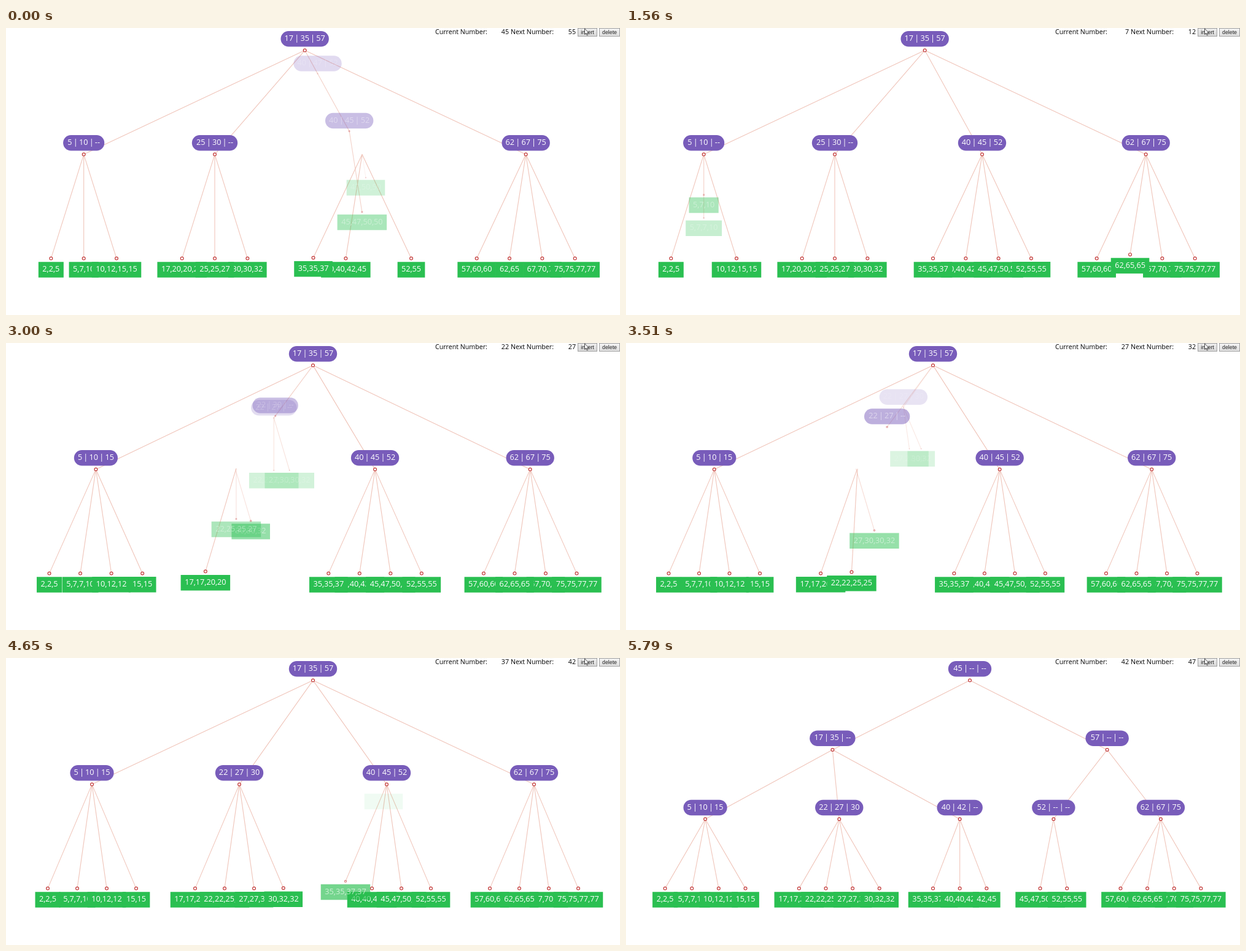
Write an HTML page with a canvas that moves like this. It is 1000x469 px and loops after 5.82 s.

```html
<!DOCTYPE html>
<html lang="en">
<head>
<meta charset="utf-8">
<title>Tree insertion</title>
<style>
  html, body { margin: 0; width: 100%; height: 100%; overflow: hidden; background: #fff; }
  canvas { display: block; }
</style>
</head>
<body>
<canvas id="stage" width="1000" height="469"></canvas>
<script>
const ctx = document.getElementById('stage').getContext('2d');
const LOOP = 5820, TICK = 30, MOVE = 620, FADE = MOVE * 4 / 3;
const PURPLE = '#785cba', GREEN = '#2abf51', LINK = '#f0c5ba', RING = '#c43c3c';
const TOP = 36.6, HEIGHT = 340, LEFT = 20, WIDTH = 960;

const firstTree = '17|35|57[5|10[2,2,5 5,7,10 10,12,15,15] 25|30[17,20,20,22 25,27 30,30,32] ' +
  '40|47|52[35,37 40,40,42,45 47,50,50 52,55] 62|67|75[57,60,60 62,65 67,70,70 75,75,77,77]]';

// Start time, inserted number, then the edits it makes to the tree.
const inserts = [
  [-1400, 25, ['25,27', '25,25,27']],
  [-883, 35, ['35,37', '35,35,37']],
  [-383, 45, ['40|47|52', '40|45|52'], ['47,50,50', '45,47,50,50']],
  [263, 55, ['52,55', '52,55,55']],
  [785, 65, ['62,65', '62,65,65']],
  [1225, 7, ['5,7,10', '5,7,7,10']],
  [1667, 12, ['5|10[', '5|10|15['], ['10,12,15,15', '10,12,12 15,15']],
  [2174, 17, ['25|30', '22|30'], ['17,20,20,22 25,25,27', '17,17,20,20 22,25,25,27']],
  [2689, 22, ['22|30', '22|27'], ['22,25,25,27 30,30,32', '22,22,25,25 27,30,30,32']],
  [3222, 27, ['22|27', '22|27|30'], ['27,30,30,32', '27,27,30 30,32']],
  [3709, 32, ['30,32', '30,32,32']],
  [4190, 37, ['35,35,37', '35,35,37,37']],
  [4677, 42, ['17|35|57[', '45[17|35['], ['40|45|52[', '40|42['],
    ['40,40,42,45 ', '40,40,42 42,45]] 57[52['], ['77,77', '77,77]']]
];
const LAST_NEXT = 47;

const clamp = v => Math.max(0, Math.min(1, v));
const mix = (a, b, p) => a + (b - a) * p;
const ease = u => u < .5 ? 4 * u ** 3 : 1 - 4 * (1 - u) ** 3;

// Parses a tree and places it: siblings one unit apart, cousins two.
function layout(text) {
  const nodes = [], open = [];
  const tokens = text.match(/[\d,|]+|[[\]]/g);
  tokens.forEach((token, i) => {
    if (token === '[') open.push(nodes[nodes.length - 1]);
    else if (token === ']') open.pop();
    else {
      const leaf = tokens[i + 1] !== '[';
      const parent = open[open.length - 1];
      const label = leaf ? token : [...token.split('|'), '--', '--'].slice(0, 3).join(' | ');
      const node = { label, leaf, parent, depth: open.length, kids: [] };
      if (parent) parent.kids.push(node);
      nodes.push(node);
    }
  });
  const leaves = nodes.filter(n => n.leaf);
  let unit = 0;
  leaves.forEach((n, i) => {
    unit += i && leaves[i - 1].parent !== n.parent ? 2 : 1;
    n.x = unit;
  });
  const scale = WIDTH / (unit + 1);
  leaves.forEach(n => n.x = LEFT + n.x * scale);
  [...nodes].reverse().filter(n => !n.leaf)
    .forEach(n => n.x = (n.kids[0].x + n.kids[n.kids.length - 1].x) / 2);
  nodes.forEach(n => n.y = TOP + HEIGHT * n.depth / leaves[0].depth);
  return nodes.sort((a, b) => a.depth - b.depth);
}

// A place is a node's point together with the parent end of its link.
const place = (point, end = point) => ({ x: point.x, y: point.y, px: end.x, py: end.y });
const home = node => place(node, node.parent);

function pose(item, t) {
  const p = ease(clamp((t - item.start) / MOVE));
  const q = ease(clamp((t - item.start) / FADE));
  const at = {};
  for (const k of ['x', 'y', 'px', 'py']) at[k] = mix(item.from[k], item.to[k], p);
  at.alpha = item.kind === 'enter' ? q : item.kind === 'exit' ? item.alpha * (1 - p) : 1;
  at.link = item.kind === 'enter' ? p : item.kind === 'exit' ? 1 - p : 1;
  return at;
}

function buildScenes() {
  let text = firstTree, old = layout(text);
  let items = old.map(node => ({ node, kind: 'stay', start: -1e4, from: home(node), to: home(node) }));
  return inserts.map(([start, number, ...edits], i) => {
    for (const [a, b] of edits) text = text.replace(a, b);
    const fresh = layout(text);
    const find = (list, label) => list.find(n => n.label === label);
    const next = [];
    for (const item of items) {
      if (item.kind === 'exit') {
        if (start < item.start + MOVE) next.push(item);
        continue;
      }
      const from = pose(item, start), node = find(fresh, item.node.label);
      if (node) next.push({ node, kind: 'stay', start, from, to: home(node) });
      else next.push({ node: item.node, kind: 'exit', start, from, alpha: from.alpha,
        to: place(item.node.parent || item.node) });
    }
    for (const node of fresh.filter(n => !find(old, n.label))) {
      let origin = node;
      while (origin.parent && !find(old, origin.label)) origin = origin.parent;
      origin = find(old, origin.label) || origin;
      next.push({ node, kind: 'enter', start, from: place(origin), to: home(node) });
    }
    items = next;
    old = fresh;
    return { start, number, next: i + 1 < inserts.length ? inserts[i + 1][1] : LAST_NEXT, items };
  });
}
const scenes = buildScenes();

const charWidth = { ',': 3.5, '-': 5.2, ' ': 3.2, '|': 5 };
const boxWidth = label => [...label].reduce((sum, c) => sum + (charWidth[c] || 7.2), 12.4);

function write(text, x, y, font, color, align = 'left') {
  ctx.font = font;
  ctx.fillStyle = color;
  ctx.textAlign = align;
  ctx.fillText(text, x, y);
}

function drawLink(at) {
  ctx.globalAlpha = at.link;
  ctx.strokeStyle = LINK;
  ctx.lineWidth = 1.1;
  ctx.beginPath();
  ctx.moveTo(at.px, at.py);
  ctx.lineTo(at.x, at.y);
  ctx.stroke();
}

function drawNode({ label, leaf }, at) {
  const w = boxWidth(label), h = 25.5;
  const cy = at.y + (leaf ? 16 + 2.3 * at.alpha : -16 - 2.8 * at.alpha);
  ctx.globalAlpha = at.alpha;
  ctx.beginPath();
  ctx.arc(at.x, at.y, 2.4 * at.alpha, 0, 7);
  ctx.fillStyle = '#fff';
  ctx.fill();
  ctx.strokeStyle = RING;
  ctx.lineWidth = 1.2;
  ctx.stroke();
  ctx.beginPath();
  ctx.roundRect(at.x - w / 2, cy - h / 2, w, h, leaf ? 0 : h / 2);
  ctx.fillStyle = leaf ? GREEN : PURPLE;
  ctx.fill();
  ctx.wordSpacing = '-1.1px';
  write(label, at.x, cy + 3.2, '500 12.7px "Open Sans", sans-serif', '#fff', 'center');
  ctx.wordSpacing = '0px';
}

function drawButton(label, x, w, light, dark) {
  const fill = ctx.createLinearGradient(0, 0, 0, 14);
  fill.addColorStop(0, light);
  fill.addColorStop(1, dark);
  ctx.fillStyle = fill;
  ctx.fillRect(x, 0, w, 14);
  ctx.strokeStyle = '#a0a0a0';
  ctx.lineWidth = 1;
  ctx.strokeRect(x + .5, .5, w - 1, 13);
  write(label, x + w / 2, 10, '8.8px "Liberation Sans", sans-serif', '#222', 'center');
}

function drawHeader({ number, next }) {
  const font = '10.65px "Open Sans", sans-serif';
  write('Current Number:', 699, 10, font, '#000');
  write(number, 819, 10, font, '#000', 'right');
  write('Next Number:', 822, 10, font, '#000');
  write(next, 928, 10, font, '#000', 'right');
  drawButton('insert', 931, 32, '#eee', '#d6d6d6');
  drawButton('delete', 966, 34, '#f4f4f4', '#dedede');
  const cursor = new Path2D('M942.5 1v9.5l2.2-2 1.5 3.4 1.5-.7-1.5-3.2h3z');
  ctx.fillStyle = '#fff';
  ctx.fill(cursor);
  ctx.strokeStyle = '#222';
  ctx.lineWidth = .8;
  ctx.stroke(cursor);
}

function frame(now) {
  const t = Math.floor(now % LOOP / TICK) * TICK;
  const scene = scenes.filter(s => s.start <= t).pop();
  const shown = scene.items
    .filter(item => item.kind !== 'exit' || t < item.start + MOVE)
    .map(item => ({ node: item.node, at: pose(item, t) }));
  ctx.globalAlpha = 1;
  ctx.fillStyle = '#fff';
  ctx.fillRect(0, 0, 1000, 469);
  shown.forEach(s => drawLink(s.at));
  shown.forEach(s => drawNode(s.node, s.at));
  ctx.globalAlpha = 1;
  drawHeader(scene);
  requestAnimationFrame(frame);
}
requestAnimationFrame(frame);
</script>
</body>
</html>
```
